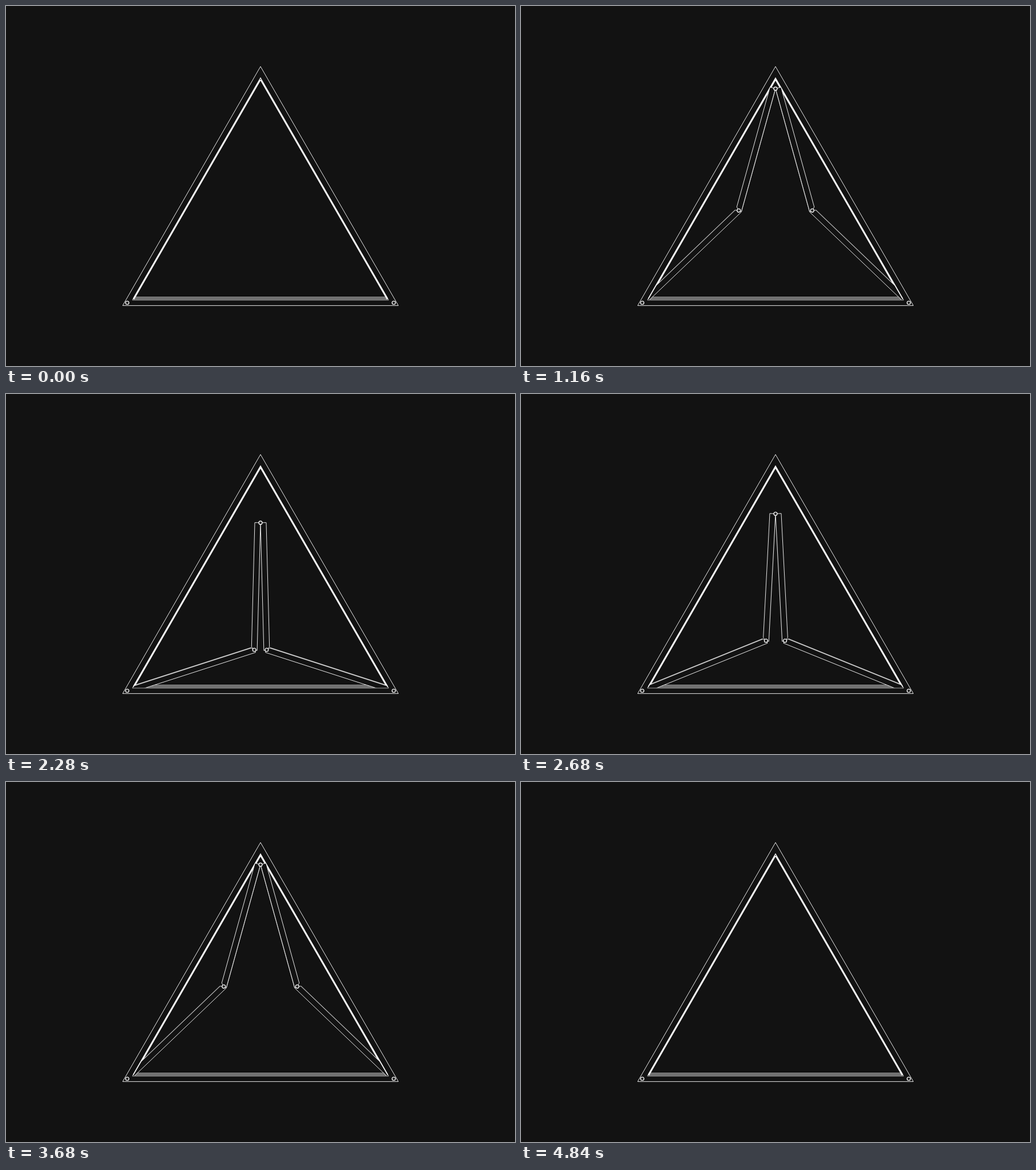
Animation of 890x629 px, one loop 4880 ms. Source, as an HTML page with a canvas:

```html
<!DOCTYPE html>
<html>
<head>
<meta charset="utf-8">
<style>
html, body { margin: 0; width: 100%; height: 100%; overflow: hidden; background: #121212; }
canvas { display: block; }
</style>
</head>
<body>
<canvas width="890" height="629"></canvas>
<script>
const BG = '#121212', INK = '#f4f4f4';
const STEP = 40, TURN = 60, COUNT = 122;   // 61 poses out, 61 poses back
const UPPER = 222.3, LOWER = 233.4, HALF = 5;
const PIVOT = { x: -233, y: 518.5 };       // x is measured from the axis of symmetry
const ctx = document.querySelector('canvas').getContext('2d');

function trace(points, closed = true) {
  ctx.beginPath();
  points.forEach(([x, y]) => ctx.lineTo(x, y));
  if (closed) ctx.closePath();
}

function line(points, width = 1, closed = true) {
  trace(points, closed);
  ctx.lineWidth = width;
  ctx.stroke();
}

function panel(points) {
  trace(points);
  ctx.fill();
  ctx.lineWidth = 0.95;
  ctx.stroke();
}

// Soft extra weight along one edge of a panel
function accent(points, width, alpha) {
  ctx.globalAlpha = alpha;
  line(points, width, false);
  ctx.globalAlpha = 1;
}

function ring(x, y) {
  ctx.beginPath();
  ctx.arc(x, y, 2.9, 0, 7);
  ctx.fill();
  ctx.lineWidth = 1.4;
  ctx.stroke();
}

const triangle = (halfWidth, top, base) => [[-halfWidth, base], [0, top], [halfWidth, base]];

// Maps (distance along, distance sideways) to stage points
const frameAt = (o, dx, dy) => (u, v) => [o.x + dx * u + dy * v, o.y + dy * u - dx * v];

function linkage(pose) {
  const progress = pose / TURN;
  const angle = (1 - progress) * Math.PI / 6;
  const s = Math.sin(angle), c = Math.cos(angle);
  const knee = { x: -UPPER * s - HALF * c };
  const reach = knee.x - PIVOT.x;
  const rise = Math.sqrt(LOWER * LOWER - reach * reach);
  knee.y = PIVOT.y - rise;
  const apex = { x: 0, y: knee.y - UPPER * c + HALF * s };

  const lower = frameAt(knee, reach / LOWER, -rise / LOWER);
  const upper = (u, v) => [apex.x - s * u - c * v, apex.y + c * u - s * v];
  const tail = -LOWER - 8;

  for (const side of [1, -1]) {
    ctx.save();
    ctx.scale(side, 1);
    panel([lower(tail, HALF), lower(-4.4, HALF), lower(0, 0),
           lower(0.8, -HALF), lower(tail, -HALF)]);
    accent([lower(tail, HALF), lower(-4.4, HALF)], 2.1, 0.6 * progress ** 2);
    panel([upper(0, 0), upper(0, 2 * HALF), upper(UPPER - 5, 2 * HALF),
           upper(UPPER, HALF), upper(UPPER + 1, 0)]);
    accent([upper(0, 0), upper(UPPER + 1, 0)], 1.2, 1 - progress);
    ring(knee.x, knee.y);
    ctx.restore();
  }
  ring(apex.x, apex.y);
}

function draw(now) {
  const index = Math.floor(now / STEP) % COUNT;
  const pose = Math.min(index, COUNT - 1 - index);

  ctx.setTransform(1, 0, 0, 1, 0, 0);
  ctx.fillStyle = BG;
  ctx.strokeStyle = INK;
  ctx.fillRect(0, 0, 890, 629);
  ctx.translate(445, 0);

  line(triangle(241, 105.7, 523.4), 0.95);
  ring(PIVOT.x, PIVOT.y);
  ring(-PIVOT.x, PIVOT.y);
  for (let i = 0; i < 4; i++) {
    line(triangle(224 - 1.4 * i, 125.5 + 1.2 * i, 513.8 - 1.75 * i), 0.75);
  }
  line(triangle(222, 127.5, 512), 3, false);

  ctx.save();
  trace(triangle(222.4, 127, 513.2));
  ctx.clip();
  linkage(pose);
  ctx.restore();
}

const start = performance.now();
function tick() {
  draw(performance.now() - start);
  requestAnimationFrame(tick);
}
tick();
</script>
</body>
</html>
```
